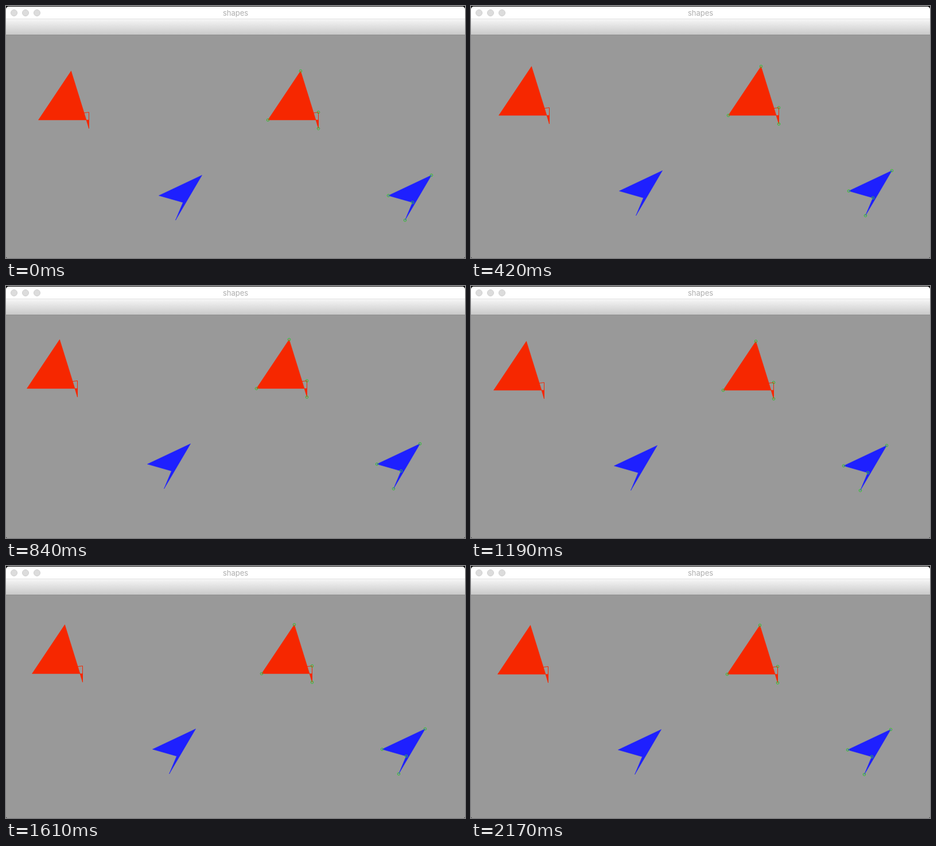
An HTML page with a canvas that plays this animation: 800 px wide and 440 px high, repeating every 2240 ms.

```html
<!DOCTYPE html>
<html lang="en">
<head>
<meta charset="utf-8">
<title>shapes</title>
<style>
  html, body { margin: 0; width: 100%; height: 100%; overflow: hidden; background: #000; }
  canvas { display: block; }
</style>
</head>
<body>
<canvas id="stage" width="800" height="440"></canvas>
<script>
const ctx = document.getElementById('stage').getContext('2d');
const STEP = 70, STEPS = 32;
const RED = '#f62700', BLUE = '#1e20ff', GREEN = '#2fc52f';

// Diagonal drift: [step, offset], applied equally to x and y
const DRIFT = [[0, 0], [6, -8], [8, -9], [12, -20], [14, -23], [17, -17],
               [23, -11], [27, -5], [29, -16], [31, -10]];

const RED_CORNERS = [[113.5, 113.5], [56.5, 199], [144.5, 185.5], [144.5, 214]];
const BLUE_CORNERS = [[341.5, 295.5], [266.5, 331], [308.5, 343], [295.5, 374]];

function driftAt(step) {
  let i = 1;
  while (DRIFT[i][0] < step) i++;
  const [s0, d0] = DRIFT[i - 1], [s1, d1] = DRIFT[i];
  return Math.round(d0 + (d1 - d0) * (step - s0) / (s1 - s0));
}

function trace(points) {
  ctx.beginPath();
  points.forEach(([x, y]) => ctx.lineTo(x, y));
}

function polygon(points, color) {
  trace(points);
  ctx.closePath();
  ctx.fillStyle = ctx.strokeStyle = color;
  ctx.lineWidth = 0.6;
  ctx.fill();
  ctx.stroke();
}

function circle(x, y, r) {
  ctx.beginPath();
  ctx.arc(x, y, r, 0, Math.PI * 2);
}

function drawShapes() {
  const [apex, left, corner, tip] = RED_CORNERS;
  polygon([apex, left, [140, 199]], RED);
  polygon([[140, 199], [144.5, 199], tip], RED);
  trace([[136, 186.6], corner, tip]);
  ctx.lineWidth = 1;
  ctx.stroke();
  polygon(BLUE_CORNERS, BLUE);
}

function drawMarkers() {
  ctx.strokeStyle = GREEN;
  ctx.lineWidth = 1;
  for (const [x, y] of [...RED_CORNERS, ...BLUE_CORNERS]) {
    circle(x, y, 2.3);
    ctx.stroke();
  }
}

function drawWindow() {
  ctx.fillStyle = '#000';
  ctx.fillRect(0, 0, 800, 440);
  ctx.save();
  ctx.beginPath();
  ctx.roundRect(0, 1, 800, 439, [5, 5, 2, 2]);
  ctx.clip();

  ctx.fillStyle = '#999';
  ctx.fillRect(0, 0, 800, 440);
  ctx.fillStyle = '#fff';
  ctx.fillRect(0, 0, 800, 22);
  ctx.fillStyle = '#e2e2e2';
  ctx.fillRect(0, 22, 800, 1);
  const bar = ctx.createLinearGradient(0, 23, 0, 50);
  bar.addColorStop(0, '#f6f6f6');
  bar.addColorStop(1, '#c9c9c9');
  ctx.fillStyle = bar;
  ctx.fillRect(0, 23, 800, 27);
  ctx.fillStyle = '#8e8e8e';
  ctx.fillRect(0, 50, 800, 1);

  ctx.fillStyle = '#dcdcdc';
  ctx.strokeStyle = '#cecece';
  ctx.lineWidth = 1;
  for (const x of [14, 34, 54]) {
    circle(x, 12, 5.5);
    ctx.fill();
    ctx.stroke();
  }
  ctx.fillStyle = '#adadad';
  ctx.font = '13px Inter, "Liberation Sans", sans-serif';
  ctx.textAlign = 'center';
  ctx.fillText('shapes', 400, 17);
  ctx.restore();
}

function draw(ms) {
  const d = driftAt(Math.floor(ms / STEP) % STEPS);
  drawWindow();
  for (const x of [0, 400]) {
    ctx.save();
    ctx.translate(x + d, d);
    drawShapes();
    if (x) drawMarkers();
    ctx.restore();
  }
}

const start = performance.now();
function tick() {
  draw(performance.now() - start);
  requestAnimationFrame(tick);
}
tick();
</script>
</body>
</html>
```
